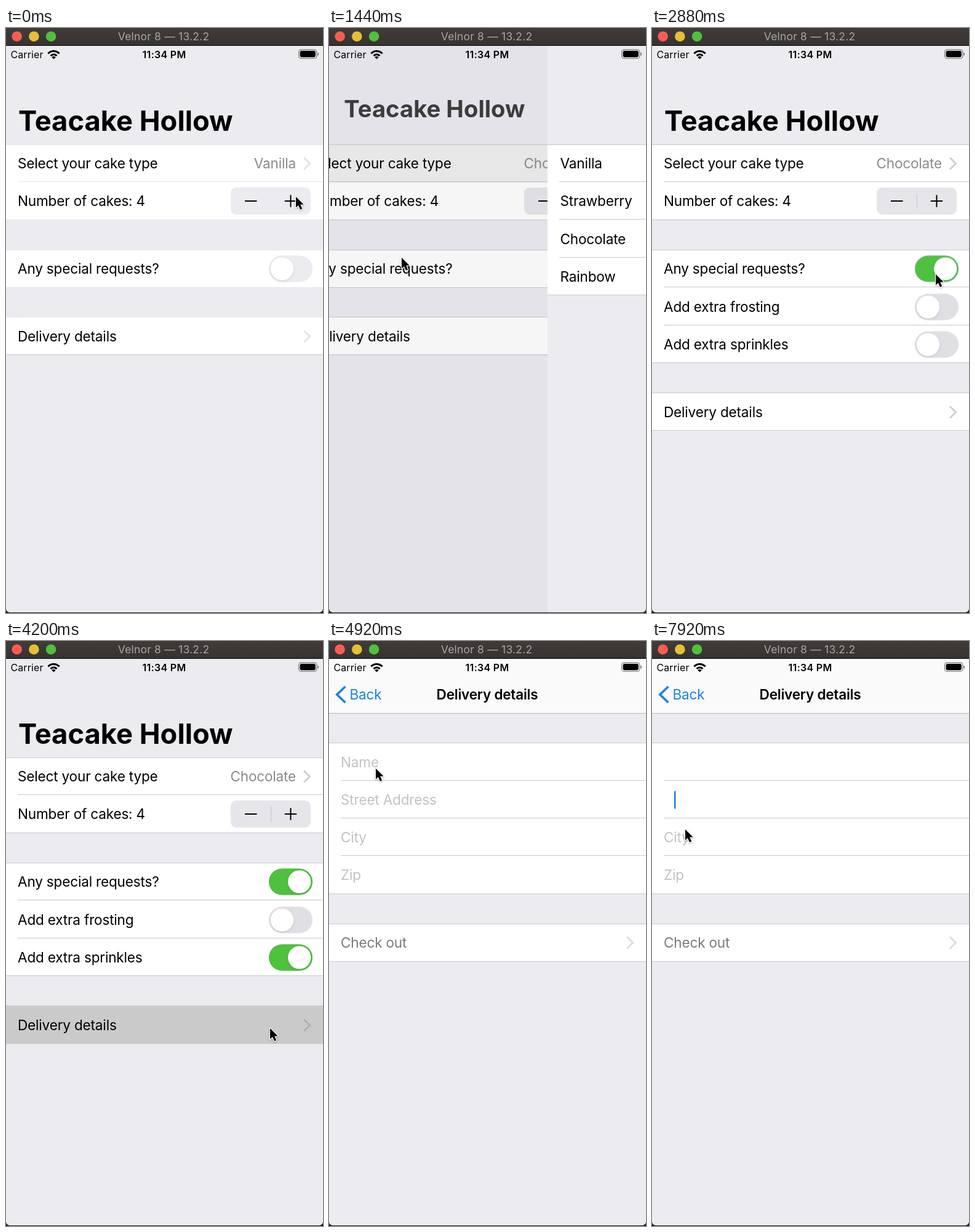
An HTML page with a canvas that plays this animation: 515 by 950 pixels, repeating every 8000 ms.

```html
<!DOCTYPE html>
<html lang="en">
<head>
<meta charset="utf-8">
<title>Cake order form</title>
<style>
html, body { margin: 0; width: 100%; height: 100%; overflow: hidden; background: #ebebf0; }
canvas { display: block; }
</style>
</head>
<body>
<canvas id="stage" width="515" height="950"></canvas>
<script>
const ctx = document.getElementById('stage').getContext('2d');
const W = 515, H = 950, LOOP = 8000, TICK = 120;
const ROW = 61.2, GAP = 48.8, LIST_TOP = 189.5, PUSH_TOP = 238, COMPACT_TOP = 166;
const BLUE = '#1f82e4', PAGE = '#ebebf0', LINE = '#c9c8cd', GREEN = '#4fc13f';
const SHOP = 'Teacake Hollow', DEVICE = 'Velnor 8 — 13.2.2';

// Event times in ms
const PUSH_PICKER = 480, PICK = 1180, POP = 1296.5, SPECIAL_ON = 2540,
      SPRINKLES_ON = 3570, TAP_DELIVERY = 4180, PUSH_DELIVERY = 4280,
      NAME_FOCUS = 5080, NAME_TYPING = 5700, STREET_FOCUS = 6920, STREET_TYPING = 7640;

// time, x, y of the pointer tip
const POINTER = [
  [0, 471, 274], [240, 471, 274], [420, 430, 226], [540, 430, 226], [720, 405, 268],
  [1080, 190, 322], [1260, 170, 322], [1440, 118, 373], [1800, 150, 385], [2400, 461, 400],
  [3000, 461, 400], [3480, 461, 522], [3660, 461, 522], [4080, 429, 629], [4320, 429, 629],
  [4800, 76, 207], [6600, 76, 207], [6840, 60, 242], [7080, 60, 245], [7500, 54, 306], [8000, 54, 306]
];

const clamp = v => Math.max(0, Math.min(1, v));
const mix = (a, b, k) => a + (b - a) * k;
const smooth = v => { v = clamp(v); return v * v * (3 - 2 * v); };
const ramp = (t, start, length) => smooth((t - start) / length);
const rowMiddle = y => Math.round(y + ROW / 2);
const edge = y => Math.floor(y - 0.5);

// Critically damped spring used by page transitions
function spring(t, start) {
  if (t <= start) return 0;
  const k = (t - start) / 60;
  const p = 1 - (1 + k) * Math.exp(-k);
  return p > 0.997 ? 1 : p;
}

function box(x, y, w, h, color, r = 0) {
  ctx.fillStyle = color;
  ctx.beginPath();
  ctx.roundRect(x, y, w, h, r);
  ctx.fill();
}

function disc(x, y, r, color) {
  ctx.fillStyle = color;
  ctx.beginPath();
  ctx.arc(x, y, r, 0, 7);
  ctx.fill();
}

function stroke(points, color, width) {
  ctx.strokeStyle = color;
  ctx.lineWidth = width;
  ctx.beginPath();
  points.forEach(([x, y], i) => i ? ctx.lineTo(x, y) : ctx.moveTo(x, y));
  ctx.stroke();
}

function text(s, x, y, { size = 22.6, weight = 400, color = '#000', align = 'left', track = -0.2 } = {}) {
  ctx.font = `${weight} ${size}px Inter, sans-serif`;
  ctx.letterSpacing = track + 'px';
  ctx.textAlign = align;
  ctx.fillStyle = color;
  ctx.fillText(s, x, y);
}

function faded(alpha, draw) {
  if (alpha <= 0) return;
  ctx.save();
  ctx.globalAlpha *= alpha;
  draw();
  ctx.restore();
}

function hLine(y, x = 0, color = LINE) {
  box(x, y, W - x, 1, color);
}

function group(y, rows, lineColor = LINE, bottomColor = lineColor) {
  const top = edge(y), bottom = edge(y + rows * ROW);
  box(0, top, W, bottom - top, '#fff');
  hLine(top, 0, lineColor);
  for (let i = 1; i < rows - 0.01; i++) hLine(Math.floor(y + i * ROW - 1), 19, lineColor);
  hLine(bottom, 0, bottomColor);
}

const label = (s, y, color, x = 19) => text(s, x, rowMiddle(y) + 8, { color });

function highlight(y, alpha) {
  faded(alpha, () => box(0, edge(y), W, ROW + 1, '#cacaca'));
}

function chevron(y, color = '#cfcfd4') {
  const c = rowMiddle(y);
  stroke([[484, c - 9.5], [493.5, c], [484, c + 9.5]], color, 3);
}

function toggle(y, offColor, t = 0, start = Infinity) {
  const c = rowMiddle(y);
  const on = ramp(t, start, 260);
  box(427, c - 21.5, 71, 43, offColor, 21.5);
  faded(on, () => box(427, c - 21.5, 71, 43, GREEN, 21.5));
  // The rim lags behind the fill while switching on
  faded(on * (1 - ramp(t, start + 240, 200)), () => {
    ctx.strokeStyle = '#9dbfc4';
    ctx.lineWidth = 1.2;
    ctx.beginPath();
    ctx.roundRect(427.6, c - 20.9, 69.8, 41.8, 20.9);
    ctx.stroke();
  });
  ctx.save();
  ctx.shadowColor = 'rgba(0,0,0,.09)';
  ctx.shadowBlur = 4;
  ctx.shadowOffsetY = 2;
  disc(mix(448.5, 476.7, on), c, 18.6, '#fff');
  ctx.restore();
}

function stepper(y, pressed) {
  const c = rowMiddle(y);
  box(365, c - 22, 130, 44, pressed ? '#ebebf0' : '#e6e6ea', 9);
  if (!pressed) box(430, c - 12, 1, 24, '#c8c8cc');
  box(388, c - 1, 19.5, 2, '#000');
  box(452.7, c - 1, 19.5, 2, '#000');
  box(461.5, c - 9.8, 2, 19.6, '#000');
}

function orderPage(t) {
  const early = t < PUSH_PICKER;
  const lineColor = early ? '#e6e6ea' : LINE;
  const offColor = early ? '#ebebf0' : '#e0e0e4';
  const chevronColor = early ? '#e4e4e8' : undefined;
  const grow = ramp(t, SPECIAL_ON, 300);
  const special = LIST_TOP + 2 * ROW + GAP;
  const rows = 1 + 2 * grow;
  const delivery = special + rows * ROW + GAP - (1 - grow) * 0.8;

  box(0, 29, W, H, PAGE);
  group(LIST_TOP, 2, lineColor);
  highlight(LIST_TOP, t < 440 ? 0 : 1 - spring(t, POP));
  label('Select your cake type', LIST_TOP);
  text(t < PICK ? 'Vanilla' : 'Chocolate', 471, rowMiddle(LIST_TOP) + 8, { color: '#8b8b8f', align: 'right' });
  chevron(LIST_TOP, chevronColor);
  label('Number of cakes: 4', LIST_TOP + ROW);
  stepper(LIST_TOP + ROW, early);

  group(special, rows, lineColor);
  label('Any special requests?', special);
  toggle(special, offColor, t, SPECIAL_ON);
  ctx.save();
  ctx.beginPath();
  ctx.rect(0, special, W, rows * ROW);
  ctx.clip();
  faded(grow, () => {
    label('Add extra frosting', special + ROW);
    toggle(special + ROW, offColor);
    label('Add extra sprinkles', special + 2 * ROW);
    toggle(special + 2 * ROW, offColor, t, SPRINKLES_ON);
  });
  ctx.restore();

  group(delivery, 1, lineColor, LINE);
  highlight(delivery, t < TAP_DELIVERY ? 0 : 1);
  label('Delivery details', delivery);
  chevron(delivery, t < TAP_DELIVERY ? chevronColor : '#b0b0b3');
}

function pickerPage(t, top) {
  box(0, 29, W, H, PAGE);
  group(top, 4);
  if (t >= PICK) highlight(top + 2 * ROW, 1 - ramp(t, POP, 100));
  ['Vanilla', 'Strawberry', 'Chocolate', 'Rainbow'].forEach((s, i) => label(s, top + i * ROW, '#000', 20.5));
  const c = rowMiddle(top + (t < PICK ? 0 : 2) * ROW);
  stroke([[476, c + 1], [482, c + 8], [494, c - 9]], BLUE, 2.6);
}

function caret(x, y) {
  box(x, rowMiddle(y) - 14.5, 2.6, 29, BLUE, 1);
}

function deliveryPage(t, top) {
  const hint = '#c3c3c6';
  box(0, 29, W, H, PAGE);
  group(top, 4);
  if (t < NAME_TYPING) label('Name', top, hint);
  if (t < STREET_TYPING) label('Street Address', top + ROW, hint);
  label('City', top + 2 * ROW, hint);
  label('Zip', top + 3 * ROW, hint);
  if (t >= STREET_FOCUS) {
    caret(t < STREET_TYPING ? 19.5 : t < 7780 ? 29 : 36, top + ROW);
  } else if (t >= NAME_FOCUS) {
    const typed = Math.floor(11 * clamp((t - NAME_TYPING + 100) / 1000));
    caret(19.5 + typed * 12, top);
  }
  const checkout = top + 4 * ROW + GAP;
  group(checkout, 1);
  label('Check out', checkout, '#7b7b7d');
  chevron(checkout, '#dfdfe3');
}

// q: 0 = large title, 1 = compact bar with a back button
function navBar(q, settled, back, title) {
  faded(settled, () => {
    box(0, 29, W, 88, '#fafafb');
    box(0, 117, W, 1, '#b9b9bc');
  });
  const size = mix(45.3, 22.6, q), x = mix(20, 33.5, q), y = mix(167, 95, q);
  faded(1 - clamp((q - 0.1) / 0.8), () => text(SHOP, x, y, { size, weight: 700, track: 0 }));
  faded(clamp((q - 0.4) / 0.4), () => text(back, x, y, { size, color: BLUE }));
  faded(clamp((q - 0.95) * 20), () => stroke([[26.5, 74], [13, 87], [26.5, 100]], BLUE, 3.8));
  if (title) faded(q, () => text(title, 257 + (1 - q) * 220, 95, { weight: 600, align: 'center', track: -0.25 }));
}

// Slides the front page over the back one; p = 1 means fully covered
function stackPages(p, under, over) {
  if (p < 1) {
    ctx.save();
    ctx.translate(-0.3 * W * p, 0);
    under();
    ctx.restore();
    box(0, 29, W, H, `rgba(10,10,50,${0.11 * p})`);
  }
  if (p > 0) {
    ctx.save();
    ctx.translate(Math.round(W * (1 - p)), 0);
    over();
    ctx.restore();
  }
}

function screen(t) {
  const order = () => orderPage(t);
  if (t < 2400) {
    const popping = t >= POP;
    const p = popping ? 1 - spring(t, POP) : spring(t, PUSH_PICKER);
    const settled = popping ? 0 : ramp(t, PUSH_PICKER + 380, 90);
    const top = popping ? LIST_TOP : mix(PUSH_TOP, COMPACT_TOP, settled);
    stackPages(p, order, () => pickerPage(t, top));
    navBar(p, settled, SHOP);
  } else {
    const p = spring(t, PUSH_DELIVERY);
    const settled = ramp(t, PUSH_DELIVERY + 380, 90);
    stackPages(p, order, () => deliveryPage(t, mix(PUSH_TOP, COMPACT_TOP, settled)));
    navBar(p, settled, 'Back', 'Delivery details');
  }
}

function statusBar() {
  text('Carrier', 7.5, 49, { size: 16, track: 0.1 });
  text('11:34 PM', 257, 49, { size: 16, weight: 600, align: 'center', track: 0.3 });
  ctx.strokeStyle = '#000';
  ctx.lineWidth = 3;
  [6.5, 11.2].forEach((r, i) => {
    ctx.beginPath();
    ctx.arc(77.5, 49.5, r + i * 0.9, -Math.PI * 0.77, -Math.PI * 0.23);
    ctx.stroke();
  });
  ctx.fillStyle = '#000';
  ctx.beginPath();
  ctx.moveTo(77.5, 50.5);
  ctx.arc(77.5, 50.5, 4.4, -Math.PI * 0.77, -Math.PI * 0.23);
  ctx.fill();
  ctx.strokeStyle = '#77777a';
  ctx.lineWidth = 1.2;
  ctx.beginPath();
  ctx.roundRect(475.6, 35.1, 29.2, 14.4, 4);
  ctx.stroke();
  box(477.6, 37.1, 25.2, 10.4, '#000', 2.4);
  box(506.3, 40, 1.6, 4.8, '#77777a', 1);
}

function windowFrame() {
  const shade = ctx.createLinearGradient(0, 0, 0, 28);
  shade.addColorStop(0, '#413c3a');
  shade.addColorStop(1, '#363230');
  box(0, 0, W, 28, shade);
  box(0, 28, W, 1, '#0c0b0b');
  ['#fc5b53', '#e5bf36', '#50c13c'].forEach((color, i) => disc(17.7 + i * 27.7, 13.7, 8.3, color));
  text(DEVICE, 256, 20.2, { size: 17.5, color: '#a9a5a3', align: 'center', track: 0.2 });
  // Everything outside the rounded bottom corners
  ctx.fillStyle = '#1c1a1c';
  ctx.beginPath();
  ctx.rect(0, H - 30, W, 30);
  ctx.roundRect(0, H - 30, W, 29, [0, 0, 6, 6]);
  ctx.fill('evenodd');
}

function pointer(t) {
  const i = Math.max(1, POINTER.findIndex(k => k[0] > t));
  const [t0, x0, y0] = POINTER[i - 1], [t1, x1, y1] = POINTER[i];
  const k = smooth((t - t0) / (t1 - t0));
  ctx.save();
  ctx.translate(mix(x0, x1, k), mix(y0, y1, k));
  ctx.beginPath();
  [[0, 0], [0, 17.6], [4, 13.9], [7, 20.8], [10.2, 19.4], [7.2, 12.7], [12.6, 12.4]]
    .forEach(([x, y]) => ctx.lineTo(x, y));
  ctx.closePath();
  ctx.shadowColor = 'rgba(0,0,0,.3)';
  ctx.shadowBlur = 3;
  ctx.shadowOffsetY = 1;
  ctx.strokeStyle = '#fff';
  ctx.lineWidth = 2.4;
  ctx.lineJoin = 'round';
  ctx.stroke();
  ctx.shadowColor = 'transparent';
  ctx.fillStyle = '#000';
  ctx.fill();
  ctx.restore();
}

function draw(now) {
  const time = now % LOOP;
  const t = time < 2 * TICK ? 0 : Math.floor(time / TICK) * TICK;
  screen(t);
  statusBar();
  windowFrame();
  pointer(t);
}

const begin = performance.now();
function loop() {
  draw(performance.now() - begin);
  requestAnimationFrame(loop);
}
loop();
</script>
</body>
</html>
```
